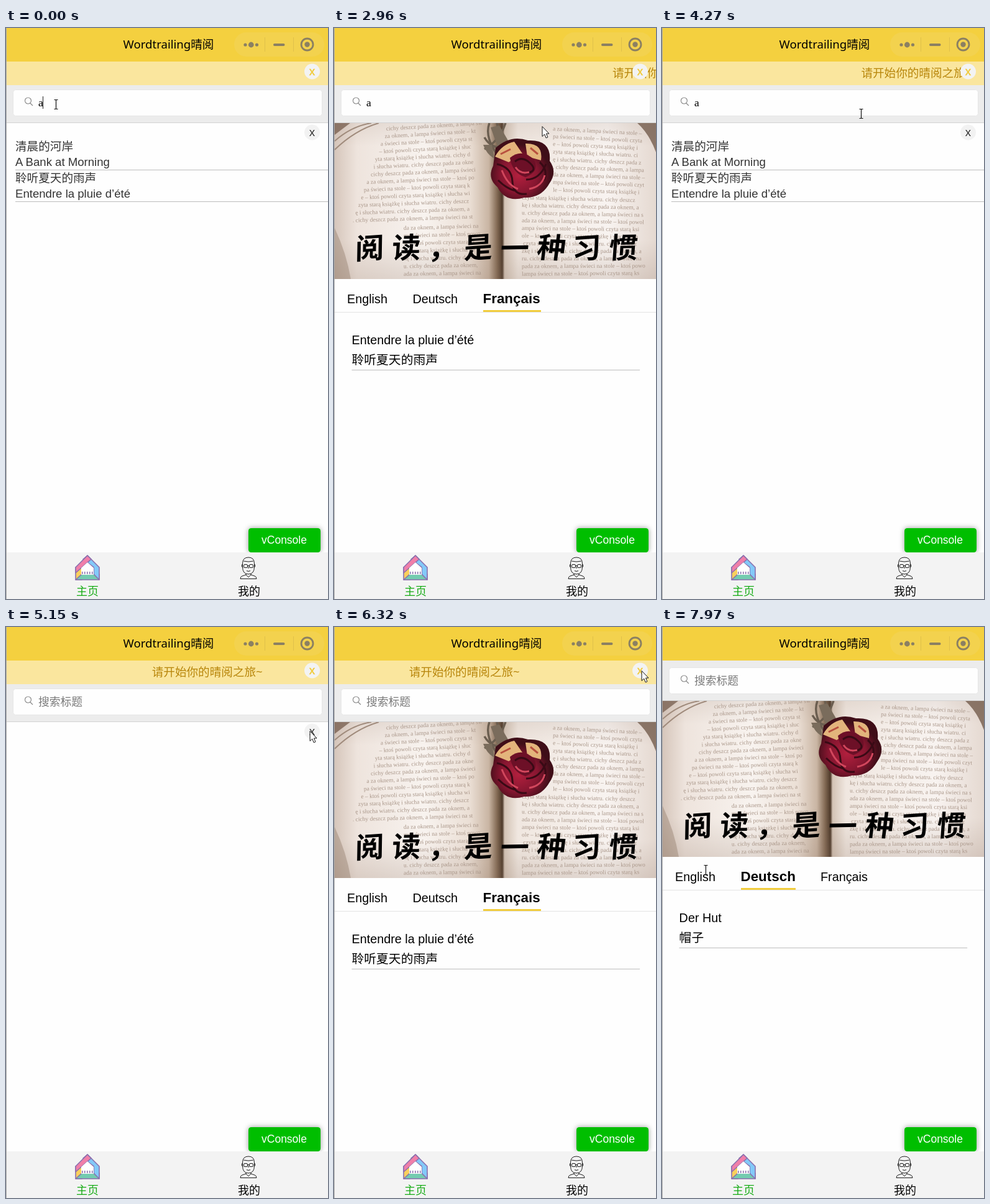
An HTML page for the animation above (8 s loop, 518x919 px).

```html
<!DOCTYPE html>
<html lang="zh-CN">
<head>
<meta charset="utf-8">
<style>
  html, body { margin: 0; width: 100%; height: 100%; overflow: hidden; background: #fefefe; }
  svg { display: block; }
  text { white-space: pre; }
  .zh { font: 18.6px "Noto Sans", "Noto Sans CJK SC", "Noto Sans CJK", sans-serif; }
  .en { font: 18.6px "Liberation Sans", Arial, sans-serif; }
  .big { font-size: 19.8px; }
  .on { font-size: 22.4px; font-weight: bold; }
  .mid { text-anchor: middle; }
  .brush { font: bold 46px "Noto Sans CJK SC", "Noto Sans CJK", sans-serif; }
  .print { font: 9.5px "Liberation Serif", serif; fill: #a99689; }
</style>
</head>
<body>
<svg width="518" height="919" viewBox="0 0 518 919">
  <defs>
    <linearGradient id="paper">
      <stop offset="0" stop-color="#d6c6bb"/><stop offset=".07" stop-color="#eee4dd"/>
      <stop offset=".28" stop-color="#f8f3ef"/><stop offset=".42" stop-color="#ebdfd5"/>
      <stop offset=".48" stop-color="#c9b5a3"/><stop offset=".505" stop-color="#846b55"/>
      <stop offset=".522" stop-color="#4d3929"/><stop offset=".529" stop-color="#d3c3b5"/>
      <stop offset=".57" stop-color="#f0e7e0"/><stop offset=".85" stop-color="#f8f3f0"/>
      <stop offset="1" stop-color="#e5d9d1"/>
    </linearGradient>
    <linearGradient id="shade" x2="0" y2="1">
      <stop offset="0" stop-color="#8a7060" stop-opacity=".12"/>
      <stop offset=".15" stop-color="#8a7060" stop-opacity="0"/>
      <stop offset=".75" stop-color="#8a7060" stop-opacity="0"/>
      <stop offset="1" stop-color="#8a7060" stop-opacity=".2"/>
    </linearGradient>
    <radialGradient id="petal" cx=".45" cy=".6">
      <stop offset="0" stop-color="#b3203e"/><stop offset=".6" stop-color="#861630"/><stop offset="1" stop-color="#3f0e18"/>
    </radialGradient>
    <filter id="glow" x="-20%" y="-50%" width="140%" height="200%">
      <feDropShadow dx="0" dy="0" stdDeviation="4" flood-opacity=".4"/>
    </filter>
  </defs>

  <g id="content">
    <rect y="54" width="518" height="99" fill="#ececec"/>
    <path d="M0 152.5H518" stroke="#d2d2d2"/>
    <rect x="11.5" y="99.5" width="497" height="42" rx="4" fill="#fefefe" stroke="#e6e6e6"/>
    <g fill="none" stroke="#8c8c8c" stroke-width="1.2"><circle cx="35.5" cy="117" r="5"/><path d="M39 121l4 4"/></g>
    <text id="hint" class="zh" x="52" y="126.5" style="font-size:17.8px" fill="#7b7b7b">搜索标题</text>
    <text id="query" x="52" y="126" style="font:17.5px 'Liberation Serif',serif">a</text>
    <path id="caret" d="M59.5 110v20" stroke="#222"/>

    <svg x="1" y="153" width="517" height="251" viewBox="1 153 517 251">
      <rect x="1" y="153" width="517" height="251" fill="url(#paper)"/>
      <rect x="1" y="153" width="517" height="251" fill="url(#shade)"/>
      <path d="M1 182Q28 158 60 153M1 196Q34 164 72 153" fill="none" stroke="#a08b7c" stroke-width="2"/>
      <path d="M1 153H26L1 172z" fill="#6d5444" opacity=".7"/>
      <path d="M518 153H488Q507 170 518 200z" fill="#6d5444" opacity=".75"/>
      <path d="M1 322Q20 362 27 404H1z" fill="#8d7665" opacity=".4"/>
      <g id="print"></g>
      <path d="M250 153q-8 22 12 50M262 153q4 20 12 32M276 153q-9 28-34 42M242 176q8 14 22 16" fill="none" stroke="#6b5e50" stroke-width="3.500"/>
      <path d="M252 160l14-3 14 24-16 12zM240 188l14 0 4 22q-12-6-18-22z" fill="#7a6c5c"/>
      <path d="M260 193Q284 171 312 181Q350 179 347 214Q360 232 346 251Q333 274 306 273Q276 282 263 256Q246 242 256 222z" fill="url(#petal)"/>
      <path d="M259 207Q270 187 290 183L303 202 281 216zM308 186Q337 185 333 213L311 207z" fill="#e3b47c"/>
      <path d="M268 203l16-8M316 193l12 10" stroke="#b8503f" stroke-width="3"/>
      <path d="M283 209Q302 193 322 212Q331 232 308 240Q287 234 283 209z" fill="#6d1027"/>
      <path d="M262 219q24 5 25 28t23 20M341 219q-10 25-32 25M291 215q12-10 25 3t-8 16M331 216q14 12 7 29M264 245q14 14 28 17" fill="none" stroke="#390a15" stroke-width="3"/>
      <path d="M270 229q9 24 26 30M314 259q21-4 25-22M292 224q8 12 22 8" fill="none" stroke="#d2475d" stroke-width="3"/>
      <g id="brush" class="brush mid"></g>
    </svg>

    <path d="M0 457.5H518" stroke="#e4e4e4"/>
    <rect id="marker" y="454" height="3" fill="#f2cd3c"/>
    <text class="en big" x="21" y="443">English</text>
    <text id="german" x="126.5" y="443">Deutsch</text>
    <text id="french" y="443">Français</text>
    <g id="frenchPage">
      <text class="en big" x="28.5" y="509">Entendre la pluie d’été</text>
      <text class="zh big" x="28.5" y="541">聆听夏天的雨声</text>
      <path d="M28.5 550.5H492" stroke="#bdbdbd"/>
    </g>
    <g id="germanPage">
      <text class="en big" x="28.5" y="509">Der Hut</text>
      <text class="zh big" x="28.5" y="541">帽子</text>
      <path d="M28.5 550.5H492" stroke="#bdbdbd"/>
    </g>
  </g>

  <g id="overlay">
    <rect y="153" width="518" height="691" fill="#fefefe"/>
    <circle cx="492.5" cy="168" r="12.5" fill="#f2f2f2"/>
    <text class="en mid" x="492.5" y="174" fill="#333">x</text>
    <g id="results" fill="#333">
      <text class="zh" x="15" y="197">清晨的河岸</text>
      <text class="en" x="15" y="222">A Bank at Morning</text>
      <text class="zh" x="15" y="248">聆听夏天的雨声</text>
      <text class="en" x="15" y="273">Entendre la pluie d’été</text>
      <path d="M15 228.5H518M15 279.5H518" stroke="#bdbdbd"/>
    </g>
  </g>

  <g id="notice">
    <rect y="54" width="518" height="38" fill="#fae69e"/>
    <text id="marquee" class="zh" y="79" fill="#b8860b">请开始你的晴阅之旅~</text>
    <circle cx="492.5" cy="70" r="12.5" fill="#f3f3f3"/>
    <text class="en mid" x="492.5" y="75.5" fill="#f0cb3c" stroke="#f0cb3c" stroke-width=".5">x</text>
  </g>

  <rect width="518" height="54" fill="#f4d03f"/>
  <text class="zh mid" x="261.5" y="33">Wordtrailing晴阅</text>
  <rect x="367" y="7" width="145" height="39" rx="19.5" fill="#f3d24e"/>
  <path d="M416.5 15V38M462.5 15V38" stroke="#dfc04a"/>
  <g fill="#8b8062">
    <circle cx="385" cy="27" r="2.6"/><circle cx="394.3" cy="27" r="4.4"/><circle cx="403.5" cy="27" r="2.6"/>
    <rect x="430" y="25" width="18.5" height="4" rx="2"/>
    <circle cx="484.5" cy="26.5" r="4.2"/>
    <circle cx="484.5" cy="26.5" r="9.5" fill="none" stroke="#8b8062" stroke-width="2.8"/>
  </g>

  <rect x="390" y="805" width="116" height="39" rx="4.5" fill="#04be02" filter="url(#glow)"/>
  <text class="en mid" x="447.5" y="830" style="font-size:17.5px" fill="#fff">vConsole</text>
  <rect y="844" width="518" height="75" fill="#f3f3f3"/>
  <g stroke="#8a70ae" stroke-width="1.6" stroke-linejoin="round">
    <path d="M112 868V888H122V866z" fill="#f9cf5c"/>
    <path d="M122 879H150V888H112z" fill="#74cbb0"/>
    <path d="M131 849L150 868V888L141 879V868L124 855z" fill="#83c9f8"/>
    <path d="M131 849L112 868V877L137 855z" fill="#f07fa9"/>
    <path d="M121 880V869L131 860L141 869V880z" fill="#fff" stroke="none"/>
    <path d="M122 877H141" stroke-width="4" stroke-dasharray="1.5 2.5"/>
  </g>
  <g fill="none" stroke="#222">
    <path d="M380.500 867v-5q0-10 9.500-10t9.500 10v5q0 12-9.500 12t-9.500-12M382 858q8 2 16 0M380 863q-2 3 1 6M400 863q2 3-1 6M386 878v2l-6 2q-3 1-3 4.500h26q0-3.500-3-4.500l-6-2v-2M386 880l4 4 4-4M387 873.500q3 2 6 0"/>
    <rect x="382.500" y="863.500" width="6" height="5" rx="1.500"/><rect x="391.500" y="863.500" width="6" height="5" rx="1.500"/>
    <path d="M388.500 865.500h3M390 867v3"/>
  </g>
  <text class="zh mid" x="131" y="913" style="font-size:18px" fill="#1aad19">主页</text>
  <text class="zh mid" x="391" y="913" style="font-size:18px">我的</text>
  <path d="M.5 0V919" stroke="#a9a9a9"/>

  <path id="arrow" d="M0 0V16L3.700 12.500 6.200 18.500 8.900 17.300 6.500 11.500H11z" fill="#fff" stroke="#111"/>
  <path id="beam" d="M-3-7.500h2.200l.8.800.8-.8H3M0-7V7M-3 7.500h2.200l.8-.8.8.8H3" fill="none" stroke="#111" stroke-width="1.200"/>
</svg>
<script>
const $ = id => document.getElementById(id);
const show = (id, on) => $(id).setAttribute('visibility', on ? 'visible' : 'hidden');
const move = (id, x, y) => $(id).setAttribute('transform', `translate(${x} ${y})`);

// Faint print on both pages of the open book
const prose = 'cichy deszcz pada za oknem, a lampa świeci na stole – ktoś powoli czyta starą książkę i słucha wiatru. ';
const printLine = (x, y, length, tilt, row) => {
  const start = row * 17 % prose.length;
  return `<text class="print" transform="translate(${x} ${y}) rotate(${tilt})">${(prose + prose + prose).substr(start, length)}</text>`;
};
let print = '';
for (let row = 0; row < 20; row++) {
  const y = 165 + row * 12.3;
  const left = row < 13 ? 84 - row * 4.5 : 112;
  print += printLine(left, y, (244 - left) / 4.2 | 0, -3.5 + row * .14, row);
  const right = row < 9 ? 352 : 302;
  print += printLine(right, y, (514 - right) / 4.2 | 0, 3 - row * .18, row + 7);
}
$('print').innerHTML = print;

$('brush').innerHTML = [...'阅读，是一种习惯'].map((char, i) =>
  `<text transform="translate(${57 + 58.2 * i} ${371 - i % 2}) rotate(${i % 3 * 3 - 4}) skewX(-5)">${char}</text>`).join('');

// The screen refreshes in bursts: [first, last, count]
const refreshes = [[0, 0, 1], [430, 550, 2], [920, 1670, 6], [1920, 1920, 1], [2300, 2960, 6],
  [3110, 3230, 2], [3380, 4270, 8], [4400, 4400, 1], [4520, 5150, 6], [5270, 5540, 3],
  [5660, 6320, 6], [6470, 6620, 2], [6740, 7730, 8], [7850, 7970, 2]]
  .flatMap(([first, last, count]) => Array.from({ length: count },
    (_, i) => first + (last - first) * i / Math.max(1, count - 1)));

const pointerPath = [[0, 80, 123], [390, 80, 123], [550, 79, 185], [860, 79, 185], [1600, 491, 167.5],
  [2200, 491, 167.5], [2960, 335, 158.5], [3230, 323, 138], [4270, 320, 138], [4560, 320, 138],
  [5000, 489, 167.5], [5300, 489, 167.5], [6100, 495, 70.5], [6480, 495, 70.5],
  [7450, 172, 402], [7560, 172, 402], [7970, 70, 391], [8000, 70, 391]];

function pointerAt(t) {
  const next = pointerPath.findIndex(key => key[0] > t);
  const [t0, x0, y0] = pointerPath[next - 1], [t1, x1, y1] = pointerPath[next];
  const p = (t - t0) / (t1 - t0), eased = p * p * (3 - 2 * p);
  return [x0 + (x1 - x0) * eased, y0 + (y1 - y0) * eased];
}

function setTab(id, active) {
  $(id).setAttribute('class', active ? 'en on' : 'en big');
}

function draw(t) {
  const searching = t < 1920 || t >= 3500 && t < 5270;
  const typed = t < 4520;
  const noticeOpen = t < 6470;
  const german = t >= 7530;

  show('overlay', searching);
  $('results').style.display = typed ? '' : 'none';
  show('query', typed);
  show('hint', !typed);
  show('caret', t < 430 || t >= 920 && t < 1420);
  show('notice', noticeOpen);
  move('content', 0, noticeOpen ? 0 : -34);
  $('marquee').setAttribute('x', t < 2240 ? 520 : 448 - .0974 * (t - 2960));

  setTab('german', german);
  setTab('french', !german);
  $('french').setAttribute('x', german ? 255 : 239.5);
  $('marker').setAttribute('x', german ? 127 : 240);
  $('marker').setAttribute('width', german ? 88 : 93);
  const p = Math.min(1, Math.max(0, (t - 7530) / 500));
  const slide = 517 * (1 - (1 - p) ** 3);
  move('frenchPage', slide, 0);
  move('germanPage', slide - 517, 0);

  const [x, y] = pointerAt(t);
  const overText = y > 380 || y > 100 && y < 142 && x < 480;
  move('arrow', x, y);
  move('beam', x + .5, y);
  show('arrow', !overText);
  show('beam', overText);
}

function tick() {
  const now = performance.now() % 8000;
  draw(refreshes.findLast(time => time <= now));
  requestAnimationFrame(tick);
}
tick();
</script>
</body>
</html>
```
